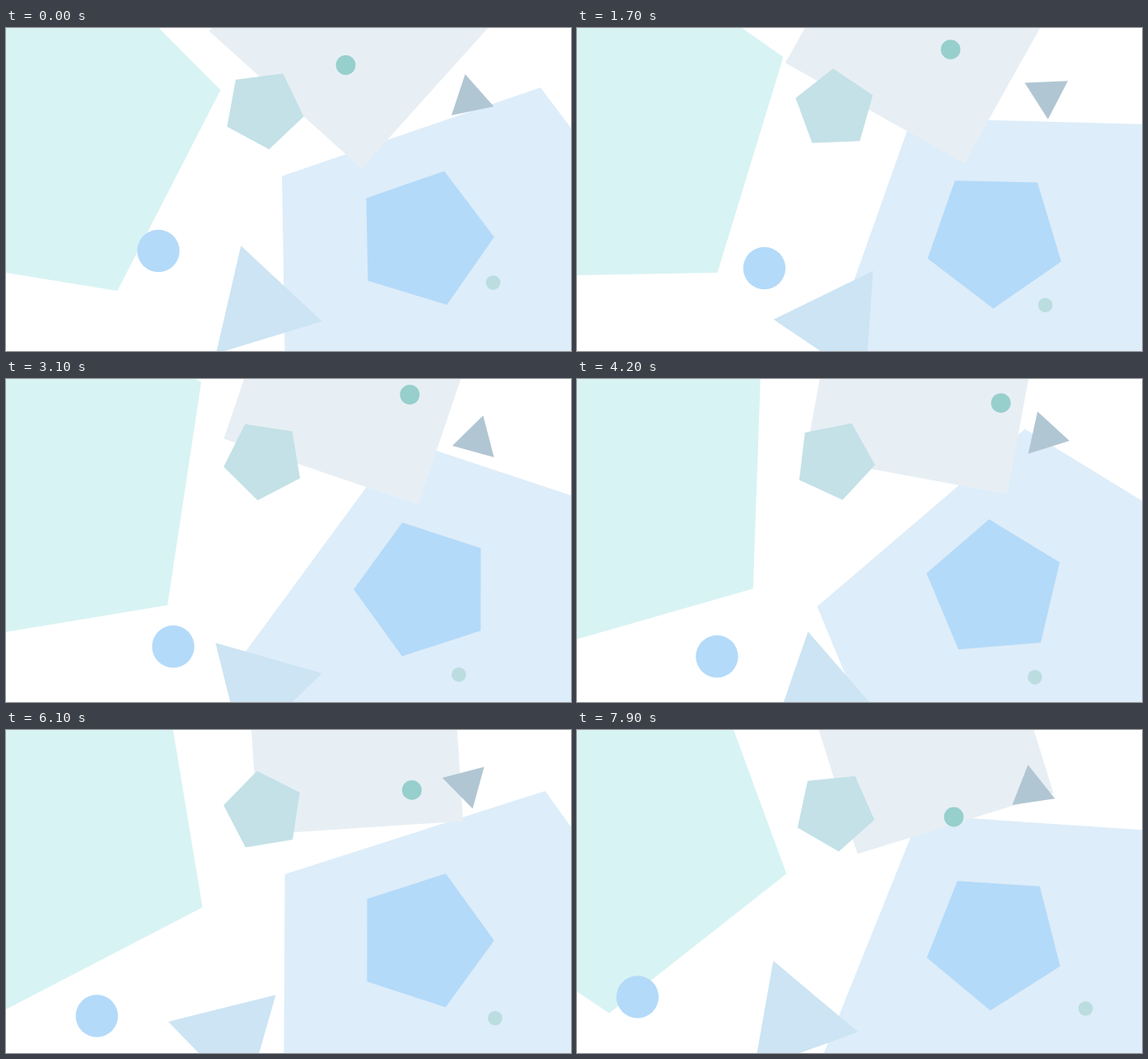
These frames come from a looping animation (686 px wide and 392 px high, 8 s). An HTML page:

```html
<!DOCTYPE html>
<html lang="en">
<head>
<meta charset="utf-8">
<title>Drifting shapes</title>
<style>
  html, body { margin: 0; width: 100%; height: 100%; overflow: hidden; background: #fff; }
  svg { display: block; width: 686px; height: 392px; }
</style>
</head>
<body>
<svg id="stage" viewBox="0 0 686 392"></svg>
<script>
const LOOP = 8000, STEP = 100, RAD = Math.PI / 180;
const stage = document.getElementById('stage');

// x, y: pivot; angle: degrees at the start; spin: degrees per second
const polygons = [
  { sides: 5, r: 233, x: 30.2, y: 111, angle: 63.2, spin: -6, fill: '#d8f3f3' },
  { sides: 5, r: 282.2, x: 566, y: 342, angle: -0.9, spin: 12, fill: '#ddedf9' },
  { sides: 4, r: 176.2, x: 422.5, y: -5.5, angle: 87, spin: -7.5, fill: '#e7eff4' },
  { sides: 5, r: 49.3, x: 312.9, y: 98.5, angle: 10.4, spin: -18, fill: '#c3e1e7' },
  { sides: 3, r: 77.6, x: 290.3, y: 357.4, angle: -107, spin: 30, fill: '#cce4f3' },
  { sides: 3, r: 30.3, x: 561.5, y: 75.9, angle: 18.4, spin: -30, fill: '#b1c6d3' },
  { sides: 5, r: 85.3, x: 507.4, y: 255.3, angle: -1.1, spin: 12, fill: '#b4daf9' }
];

// Each circle follows its path at constant speed
const circles = [
  { r: 25.7, fill: '#b4daf9', path: 'M185 270.5 Q217 260 227.5 291.5 Q231 312 202.5 325 Q150 346.5 111 347 C87 349 60 346 73.5 324' },
  { r: 11.9, fill: '#97cfcd', path: 'M412.5 45 Q450 22 490.5 19 C515 14 521 33 510 50 Q491 80 457.5 105.5' },
  { r: 8.8, fill: '#bbdde0', path: 'M591.5 309 L550 358.5 C538 372 546 366 555.5 362 L591.5 350.5 C618 342 632 343 617.5 338' }
];

function make(tag, attrs) {
  const el = document.createElementNS('http://www.w3.org/2000/svg', tag);
  for (const key in attrs) el.setAttribute(key, attrs[key]);
  return el;
}

// Triangles turn about a point a third of the way from centroid to corner
function corners({ sides, r }) {
  const shift = sides === 3 ? r / 3 : 0;
  const dx = shift * Math.cos(60 * RAD), dy = shift * Math.sin(60 * RAD);
  return Array.from({ length: sides }, (_, i) => {
    const a = i * 2 * Math.PI / sides;
    return [dx + r * Math.cos(a), dy + r * Math.sin(a)];
  }).join(' ');
}

for (const p of polygons) {
  p.el = stage.appendChild(make('polygon', { points: corners(p), fill: p.fill }));
}
for (const c of circles) {
  c.el = stage.appendChild(make('circle', { r: c.r, fill: c.fill }));
  c.track = make('path', { d: c.path });
  c.length = c.track.getTotalLength();
}

function draw(ms) {
  for (const p of polygons) {
    const angle = p.angle + p.spin * ms / 1000;
    p.el.setAttribute('transform', `translate(${p.x} ${p.y}) rotate(${angle})`);
  }
  for (const c of circles) {
    const { x, y } = c.track.getPointAtLength(c.length * ms / (LOOP - STEP));
    c.el.setAttribute('cx', x);
    c.el.setAttribute('cy', y);
  }
}

const start = performance.now();
function tick() {
  const ms = (performance.now() - start) % LOOP;
  draw(Math.floor(ms / STEP) * STEP);
  requestAnimationFrame(tick);
}
tick();
</script>
</body>
</html>
```
